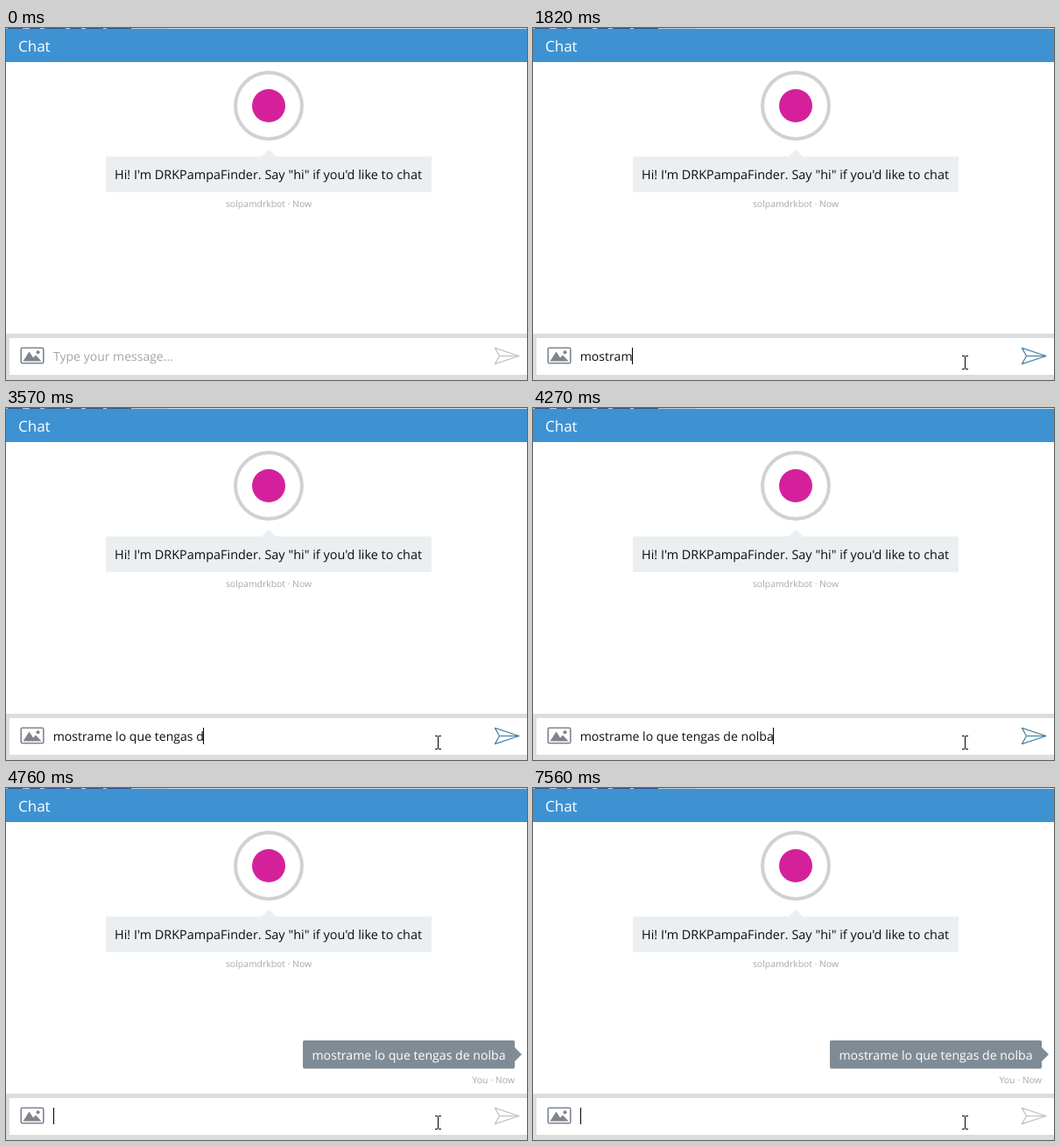
Animation, 595 px wide and 403 px high, one loop 8 s. Source, as an HTML page with a canvas:

```html
<!DOCTYPE html>
<html lang="en">
<head>
<meta charset="utf-8">
<title>Chat</title>
<style>
html, body { margin: 0; width: 100%; height: 100%; overflow: hidden; background: #fff; }
canvas { display: block; width: 595px; height: 403px; }
</style>
</head>
<body>
<canvas id="stage" width="595" height="403"></canvas>
<script>
const ctx = document.getElementById('stage').getContext('2d');
const LOOP = 8000, TICK = 70;
const MESSAGE = 'mostrame lo que tengas de nolba';
const TYPE_SIZE = 14.12;
const SENT = 4550, SETTLED = 4760;

// Tick at which each character of the message appears
const KEYS = [17, 18, 20, 22, 23, 25, 26, 27, 30, 30,
  32, 33, 35, 36, 38, 40, 42, 43, 44, 45,
  47, 48, 50, 51, 53, 55, 56, 56, 58, 59, 61];
const BLINKS = [350, 840, 1190, 5180, 5600, 6090, 6580, 7070, 7560];

ctx.textRendering = 'geometricPrecision';

function rect(x, y, w, h, color) {
  ctx.fillStyle = color;
  ctx.fillRect(x, y, w, h);
}

function text(str, x, y, size, color, align = 'left') {
  ctx.font = `${size}px "Open Sans", "Noto Sans", sans-serif`;
  ctx.textAlign = align;
  ctx.fillStyle = color;
  ctx.fillText(str, x, y);
}

function trace(points, close = true) {
  ctx.beginPath();
  points.forEach(([x, y]) => ctx.lineTo(x, y));
  if (close) ctx.closePath();
}

function poly(points, color) {
  trace(points);
  ctx.fillStyle = color;
  ctx.fill();
}

function line(points, color, width, close = false) {
  trace(points, close);
  ctx.strokeStyle = color;
  ctx.lineWidth = width;
  ctx.lineJoin = 'round';
  ctx.stroke();
}

function disc(x, y, r, color) {
  ctx.beginPath();
  ctx.arc(x, y, r, 0, Math.PI * 2);
  ctx.fillStyle = color;
  ctx.fill();
}

function header() {
  rect(0, 0, 595, 1, '#dcdfe2');
  rect(0, 0, 185, 1, '#c0cad6');
  for (const [x, w] of [[2, 17], [27, 12], [44, 24], [73, 13], [91, 20], [115, 28]]) {
    rect(x, 0, w, 1, '#34598c');
  }
  rect(0, 1, 595, 38, '#3e92d2');
  text('Chat', 14, 27, 17, '#fff');
}

function greeting() {
  disc(300, 89, 40, '#d0d1d3');
  disc(300, 89, 36, '#fff');
  disc(300, 89, 19, '#d4219b');
  rect(114, 147, 372, 41, '#ebeff2');
  poly([[291, 148], [300, 139], [309, 148]], '#ebeff2');
  text('Hi! I\'m DRKPampaFinder. Say "hi" if you\'d like to chat', 124, 173, 14.43, '#0c0c14');
  text('solpamdrkbot · Now', 300, 205, 10.4, '#a6a8ab', 'center');
}

function reply(t) {
  if (t < SENT) return;
  const step = t < SENT + TICK ? 0 : t < SETTLED ? 1 : 2;
  ctx.save();
  ctx.globalAlpha = [0.62, 0.85, 1][step];
  ctx.translate(0, 2 - step);
  ctx.beginPath();
  ctx.roundRect(339, 289, 242, 33, 2);
  ctx.fillStyle = '#d5d9dc';
  ctx.fill();
  ctx.beginPath();
  ctx.roundRect(339, 289, 242, 32, 2);
  ctx.fillStyle = '#808c95';
  ctx.fill();
  poly([[581, 297], [589, 305], [581, 313]], '#808c95');
  text(MESSAGE, 349.5, 311, TYPE_SIZE, '#fff');
  text('You · Now', 581, 338, 10.5, '#a6a8ab', 'right');
  ctx.restore();
}

function pictureIcon() {
  ctx.beginPath();
  ctx.roundRect(17.2, 366.3, 25.6, 17.4, 1.5);
  ctx.strokeStyle = '#7f848e';
  ctx.lineWidth = 1.6;
  ctx.stroke();
  poly([[19.5, 381.5], [26.5, 370.5], [31, 377.5], [34, 374.5], [40.5, 381.5]], '#7f848e');
  disc(36.5, 371.3, 2, '#7f848e');
}

function sendIcon(color) {
  line([[558.4, 366.4], [586, 375.5], [558.4, 384.6], [563.5, 375.5]], color, 1.2, true);
  line([[563.5, 375.5], [586, 375.5]], color, 1.2);
}

function caretOn(t) {
  return BLINKS.filter(b => b <= t).length % 2 === 1;
}

function inputBar(t) {
  rect(0, 350, 595, 53, '#dbdee1');
  rect(4, 355, 591, 42, '#fff');
  pictureIcon();
  const count = t < SENT ? KEYS.filter(k => k * TICK <= t).length : 0;
  const typed = MESSAGE.slice(0, count);
  if (t < KEYS[0] * TICK) text('Type your message...', 54, 381, 14.02, '#a3a5a8');
  text(typed, 53.7, 381, TYPE_SIZE, '#0c0c14');
  if (caretOn(t)) rect(54 + Math.floor(Math.max(0, ctx.measureText(typed).width - 0.4)), 366, 1, 19, '#000');
  sendIcon(count ? '#477fa6' : '#bfc1c4');
}

function scrollbar(t) {
  if (t < SENT || t >= SENT + TICK) return;
  rect(584, 1, 11, 402, '#f1f1f1');
  poly([[588.5, 392], [596.5, 392], [592.5, 396]], '#505050');
}

function pointer(t) {
  if (t < 140) return;
  const p = Math.min(1, Math.floor((t - 70) / TICK) / 7);
  const left = (1 - p) ** 2;
  const x = Math.round(493 + 9 * left), y = Math.round(383 + 18 * left);
  rect(x, y - 7, 1, 14, '#000');
  for (const dy of [-8, 7]) {
    rect(x - 3, y + dy, 3, 1, '#000');
    rect(x + 1, y + dy, 3, 1, '#000');
  }
}

function draw(now) {
  const t = now % LOOP;
  rect(0, 0, 595, 403, '#fff');
  header();
  greeting();
  reply(t);
  inputBar(t);
  scrollbar(t);
  pointer(t);
}

let start;
function frame(now) {
  start ??= now;
  draw(now - start);
  requestAnimationFrame(frame);
}
draw(0);
requestAnimationFrame(frame);
</script>
</body>
</html>
```
